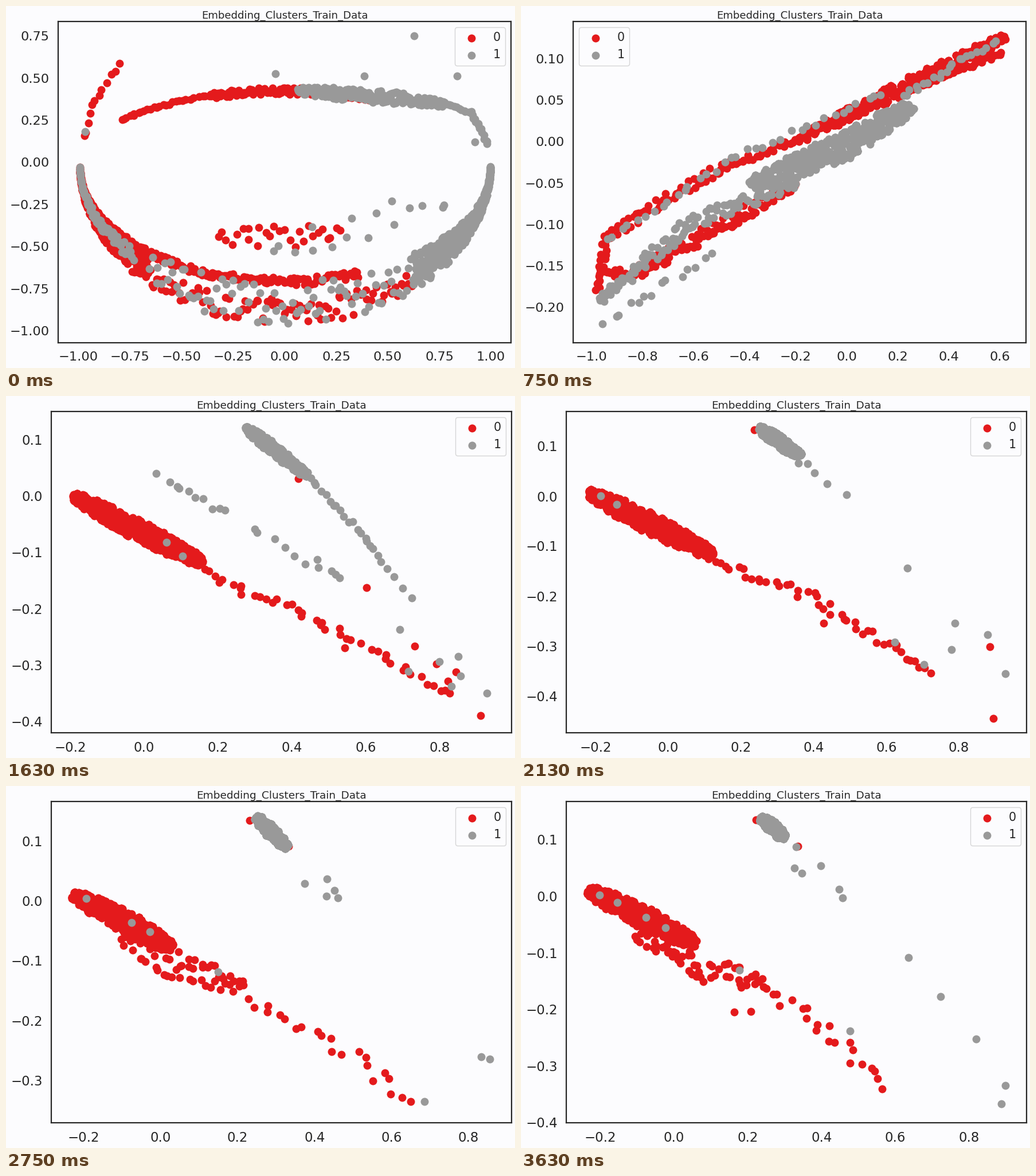
These frames come from a looping animation (888 px wide and 631 px high, 3760 ms). A matplotlib script:

```python
import numpy as np
import matplotlib.pyplot as plt
from matplotlib.animation import FuncAnimation

W, H, DPI = 888, 631, 100
LOOP, TICK, EPOCHS = 3760, 40, 30
TOP, BOTTOM = 26.5, 587
PAPER, INK, RED, GRAY = "#fcfcfe", "#262626", "#e41a1c", "#999999"
TOTAL, BLOCK = 800, 20

rng = np.random.default_rng(7)
plt.rcParams["font.family"] = "DejaVu Sans"


def spread(n):
    return (np.arange(n) + rng.random(n)) / n


def ribbon(n, width, *path):
    """Random points in a ribbon along a path, thinner at both ends."""
    x, y = np.reshape(path, (-1, 2)).astype(float).T
    s = np.r_[0, np.cumsum(np.hypot(np.diff(x), np.diff(y)))] / 1.0
    u = spread(n)
    at = u * s[-1]
    nx, ny = -np.interp(at, s, np.gradient(y)), np.interp(at, s, np.gradient(x))
    off = width * (0.25 + 0.75 * np.sqrt(np.sin(np.pi * u)))
    off *= (rng.random(n) - 0.5) / np.hypot(nx, ny)
    return np.c_[np.interp(at, s, x) + nx * off, np.interp(at, s, y) + ny * off]


def ring(n, inner, outer, start, end):
    """Random points between two half ellipses of the same width."""
    t = start + (end - start) * spread(n)
    b = inner + (outer - inner) * rng.random(n)
    return np.c_[487 + 358 * np.cos(t), 280 + b * np.sin(t)]


def dots(*xy):
    return np.reshape(xy, (-1, 2)).astype(float)


def cloud(main, *rest):
    """Join the parts, fill up from the main one, order by x, then y in blocks."""
    p = np.concatenate((main,) + rest)
    p = np.concatenate((p, main[rng.integers(len(main), size=TOTAL - len(p))]))
    p = p[np.argsort(p[:, 0])].reshape(-1, BLOCK, 2)
    rows = np.argsort(p[:, :, 1], axis=1)
    return np.take_along_axis(p, rows[:, :, None], axis=1).reshape(-1, 2)


def open_ring():
    red = cloud(ring(260, 200, 275, 3.1, 2.3),
                ring(180, 193, 207, 3.14, 1.2),
                ring(90, 230, 275, 2.3, 0.9),
                ring(100, -126, -138, 1.95, 1.1),
                ring(30, -131, -136, 2.5, 1.9),
                ribbon(27, 44, 365, 405, 590, 395),
                ribbon(12, 6, 204, 90, 151, 172, 135, 235))
    gray = cloud(ring(340, 193, 275, 0, 0.9),
                 ring(80, 200, 275, 0.9, 2.3),
                 ring(80, 205, 250, 3.14, 2.4),
                 ribbon(180, 22, 508, 147, 680, 160, 765, 171),
                 ribbon(28, 6, 755, 165, 810, 184, 842, 243),
                 ribbon(16, 60, 457, 435, 780, 330),
                 dots(712, 52, 470, 118, 625, 122, 787, 122, 818, 237, 138, 219))
    return red, gray


def two_wedges():
    red = cloud(ribbon(400, 66, 825, 54, 600, 130, 400, 220),
                ribbon(40, 18, 746, 57, 640, 92),
                ribbon(50, 24, 400, 220, 255, 310),
                ribbon(28, 24, 590, 170, 240, 395),
                ribbon(45, 30, 230, 355, 130, 410, 133, 560))
    gray = cloud(ribbon(350, 40, 593, 268, 505, 322, 420, 400, 260, 465),
                 ribbon(50, 22, 506, 371, 400, 410),
                 ribbon(40, 10, 449, 422, 350, 440),
                 ribbon(95, 20, 270, 462, 130, 430, 132, 555, 290, 488),
                 ribbon(35, 16, 135, 490, 300, 465),
                 ribbon(65, 40, 716, 67, 420, 165, 280, 255, 130, 360),
                 ribbon(18, 24, 690, 130, 770, 85))
    return red, gray


def streak():
    red = cloud(ribbon(260, 26, 845, 53, 640, 155, 480, 235),
                ribbon(40, 10, 840, 81, 690, 140),
                ribbon(90, 20, 480, 235, 350, 280, 150, 400, 132, 500),
                ribbon(120, 26, 135, 460, 190, 470, 480, 310))
    gray = cloud(ribbon(320, 46, 682, 173, 570, 242, 400, 312),
                 ribbon(110, 28, 480, 310, 300, 375, 135, 515),
                 ribbon(35, 12, 640, 150, 360, 270, 140, 415),
                 ribbon(22, 12, 832, 60, 660, 160),
                 ribbon(14, 16, 336, 429, 138, 555))
    return red, gray


def split():
    red = cloud(ribbon(320, 36, 116, 177, 240, 247, 350, 300),
                ribbon(45, 28, 350, 322, 640, 460, 840, 555),
                dots(844, 526, 832, 495, 811, 467, 676, 291, 587, 207))
    gray = cloud(ribbon(180, 20, 420, 54, 555, 165),
                 ribbon(28, 10, 558, 170, 700, 322, 796, 445, 840, 555),
                 ribbon(26, 24, 145, 193, 340, 305, 750, 520))
    return red, gray


def apart():
    red = cloud(ribbon(340, 36, 117, 168, 335, 277),
                ribbon(45, 24, 325, 280, 526, 360, 719, 482),
                dots(407, 59, 528, 396, 818, 437, 824, 562))
    gray = cloud(ribbon(150, 20, 415, 55, 488, 104),
                 dots(484, 117, 500, 118, 512, 134, 534, 153, 568, 172, 674, 300,
                      757, 396, 814, 416, 751, 442, 845, 484, 652, 429,
                      703, 468, 139, 174, 167, 189))
    return red, gray


def ragged():
    red = cloud(ribbon(340, 38, 117, 189, 290, 281),
                ribbon(60, 50, 200, 265, 310, 318, 415, 352),
                ribbon(22, 36, 410, 372, 548, 425, 714, 555),
                dots(425, 60, 493, 105))
    gray = cloud(ribbon(130, 20, 436, 54, 490, 107),
                 dots(521, 170, 560, 162, 573, 182, 579, 195, 559, 192, 829, 472,
                      844, 476, 730, 550, 370, 324, 251, 254, 219, 238, 140, 196))
    return red, gray


def settled():
    red = cloud(ribbon(340, 38, 117, 181, 305, 275),
                ribbon(60, 46, 200, 255, 330, 322, 430, 348),
                ribbon(20, 36, 430, 360, 510, 400, 635, 530),
                dots(410, 59, 483, 105, 372, 394, 401, 393))
    gray = cloud(ribbon(120, 20, 418, 55, 460, 90),
                 dots(480, 106, 477, 143, 490, 152, 523, 139, 555, 180, 561, 195,
                      676, 299, 732, 367, 794, 441, 845, 522, 838, 554, 574, 427,
                      381, 321, 252, 247, 218, 229, 168, 203, 137, 190))
    return red, gray


POSES = [pose() for pose in (open_ring, two_wedges, streak, split, apart, ragged, settled)]
KEYS = [0, 3, 6, 10, 17, 22, 29]
# x of zero, px per unit, y of zero, px per unit
SCALES = np.array([(486, 360, 272.5, 293.7), (542, 420, 291, 1285),
                   (568, 445, 236.5, 1442), (229, 652.5, 174, 1065),
                   (257, 633.8, 174.5, 870), (269.5, 671.9, 200, 1043),
                   (267, 643, 192, 986)])
# left, right, x step, x decimals, y step, y decimals, legend corner
STYLES = [(91, 881, 0.25, 2, 0.25, 2, "upper right"),
          (89, 861, 0.25, 2, 0.05, 2, "upper left"),
          (91, 881, 0.2, 1, 0.05, 2, "upper left"),
          (79, 882, 0.2, 1, 0.1, 1, "upper right")]

fig = plt.figure(figsize=(W / DPI, H / DPI), dpi=DPI, facecolor=PAPER)
ax = fig.add_axes([0.1, 0.07, 0.89, 0.89], facecolor=PAPER)
for spine in ax.spines.values():
    spine.set(color=INK, linewidth=1.6)
title = ax.set_title("Embedding_Clusters_Train_Data", color=INK, pad=3.6)
layers = [ax.scatter([], [], s=100, c=c, linewidths=0, label=name, zorder=2)
          for name, c in (("0", RED), ("1", GRAY))]
legend = ax.legend(fontsize=14.9, labelcolor=INK, facecolor=PAPER, loc="upper right")


def ticks(zero, unit, step, digits, lo, hi):
    ks = [k for k in range(-30, 31) if lo <= zero + k * step * unit <= hi]
    labels = [f"{k * step:.{digits}f}".replace("-", "\u2212") for k in ks]
    return [zero + k * step * unit for k in ks], labels


def blend(a, b, f):
    return a + (b - a) * f


def draw(n):
    epoch = (n * TICK + TICK - 1) * EPOCHS // LOOP
    i = min(np.searchsorted(KEYS, epoch, side="right") - 1, len(KEYS) - 2)
    f = (epoch - KEYS[i]) / (KEYS[i + 1] - KEYS[i])
    style = STYLES[min(i + (f >= 0.5), len(STYLES) - 1)]
    left, right, xstep, xdig, ystep, ydig, corner = style
    x0, sx, y0, sy = blend(SCALES[i], SCALES[i + 1], f)

    ax.set_position([left / W, 1 - BOTTOM / H, (right - left) / W, (BOTTOM - TOP) / H])
    ax.set_xticks(*ticks(x0, sx, xstep, xdig, left, right))
    ax.set_yticks(*ticks(y0, -sy, ystep, ydig, TOP, BOTTOM))
    ax.set_xlim(left, right)
    ax.set_ylim(BOTTOM, TOP)
    zoom = (right - left) / 790
    ax.tick_params(length=0, pad=11, labelsize=16.2 * zoom, labelcolor=INK)
    title.set_fontsize(13.1 * zoom)
    legend.set_loc(corner)
    for layer, a, b in zip(layers, POSES[i], POSES[i + 1]):
        layer.set_offsets(blend(a, b, f))
    return layers


anim = FuncAnimation(fig, draw, frames=LOOP // TICK, interval=TICK,
                     init_func=lambda: draw(0), repeat=True, repeat_delay=0)
plt.show()
```
